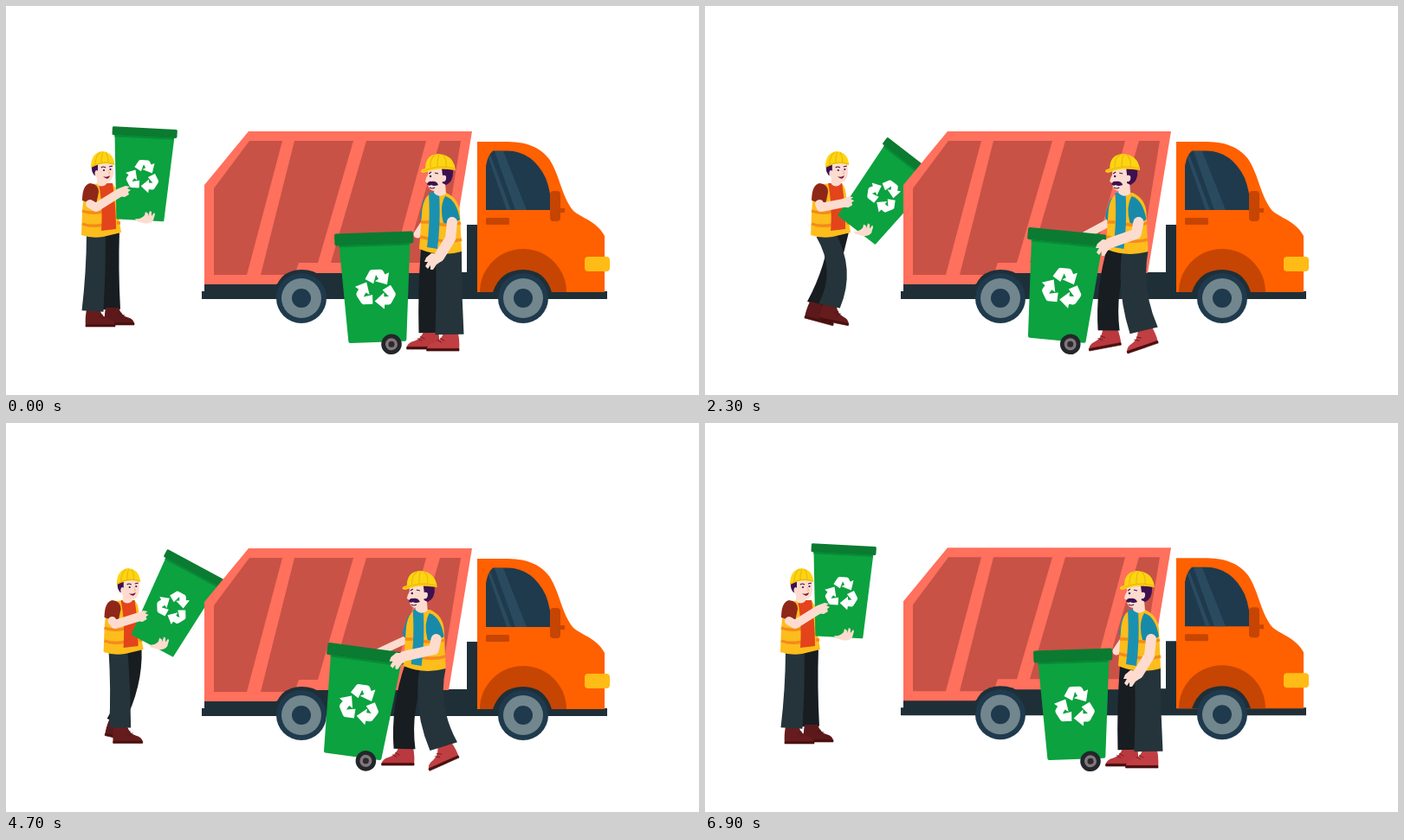
Recreate the animation shown at these times as an HTML page. Size 800x450 px, loop 7 s.

```html
<!DOCTYPE html>
<html lang="en">
<head>
<meta charset="utf-8">
<title>Waste collection</title>
<style>
  html, body { margin: 0; width: 100%; height: 100%; overflow: hidden; background: #fff; }
  svg { display: block; width: 100vw; height: 100vh; }
  .skin { fill: #fddccf; }
  .limb { fill: none; stroke: #fddccf; stroke-linecap: round; stroke-linejoin: round; }
  .hair { fill: #3d1150; }
  .hat { fill: #fcd511; }
  .rib { fill: none; stroke: #f0b413; stroke-width: 1.2; }
  .vest { fill: #fdbd1c; }
  .trim { fill: none; stroke: #f58a1c; stroke-width: 3.4; }
  .near { fill: #25343a; }
  .far { fill: #171d21; }
  .dark { fill: #1f2f38; }
  .navy { fill: #1f3a4d; }
  .steel { fill: #72868e; }
  .panel { fill: #c85246; }
  .rust { fill: #c64503; }
  .bin { fill: #0ba23f; }
  .lid { fill: #0a7b31; }
  .shade { stroke: #088a36; stroke-width: 2; }
</style>
</head>
<body>
<svg viewBox="0 0 800 450">
  <defs>
    <path id="arrow" fill="#fff" d="M-11-11L-6-19.5Q-5-20.5-3-20.5H5Q7-20.5 8-18.5L9.7-15.2L13.8-17L11.5-4.5L-1-8.6L2.8-10.8L.3-15L-2.6-6Z"/>
    <g id="recycle">
      <use href="#arrow"/>
      <use href="#arrow" transform="rotate(120)"/>
      <use href="#arrow" transform="rotate(240)"/>
    </g>
    <g id="shoe">
      <path d="M1-3H16Q19 6 26 8Q34 10 34 16H0Q-1 8 1-3Z"/>
      <path d="M0 14.5H34V17H0ZM15 6L20 3M18 8L23 5" fill="#4a1010" stroke="#4a1010" stroke-width=".6"/>
    </g>
    <g id="wheel">
      <circle r="29" class="navy"/>
      <circle r="23" class="steel"/>
      <circle r="11" class="navy"/>
    </g>
  </defs>

  <g id="loader">
    <path id="lFar" class="far"/>
    <use id="lFarShoe" href="#shoe" fill="#5b191b"/>
    <use id="lNearShoe" href="#shoe" fill="#661c1d"/>
    <path id="lNear" class="near"/>
    <g id="lBody">
      <path class="vest" d="M97 206Q89 216 88 238L87 265Q99 269 112 267L133 262L128 232Q129 209 122 205Z"/>
      <path class="trim" d="M88 237Q98 241 111 238M88 252Q99 256 112 253M127 237H130M128 251H132"/>
      <path fill="#e3441b" d="M107 205H123Q127 230 127 258L110 260Q112 230 107 205Z"/>
      <path fill="#8f2719" d="M97 205Q107 206 107 215L104 230L88 225Q88 207 97 205Z"/>
    </g>
    <g id="lHead">
      <path class="skin" d="M105 195H116V206Q110 211 105 206Z"/>
      <path class="hair" d="M99 184H109V196H102Q98 191 99 184Z"/>
      <path class="skin" d="M106 184L123 182Q126 195 121 202Q114 207 107 200Q101 197 103 191Q105 189 106 191Z"/>
      <path d="M110 187Q112 185 115 187M119 186L123 185" fill="none" stroke="#3d1150" stroke-width="1.2"/>
      <circle cx="113" cy="190" r="1.1" class="hair"/>
      <circle cx="120.5" cy="189" r="1.1" class="hair"/>
      <path d="M118 190L120 194H118" fill="none" stroke="#eeaa99" stroke-width=".8"/>
      <path d="M112 197Q116 199 120 196Q118 203 112 197Z" fill="#7a1530"/>
      <path class="hat" d="M98 187Q98 170 111 168Q124 169 125.5 184Q112 180 98 187Z"/>
      <path class="rib" d="M103 184Q103 173 109 169M110 182Q110 173 112 169M118 182Q118 173 115 169M99 186Q112 178 125 183"/>
    </g>
    <g id="lBin">
      <path class="bin" d="M3 9H72L65 106Q65 107 64 107H11Q10 107 10 106Z"/>
      <rect class="lid" width="75" height="10" rx="1.5"/>
      <path class="shade" d="M3 11H71"/>
      <use href="#recycle" transform="translate(38 56) scale(.92)"/>
    </g>
    <path id="lHold" class="skin" d="M-15 1Q-8 2-4-3L-3-7L0-5V-2L2-8L4-7L4-2L7-6L8-4L6 3Q2 8-6 6L-13 4Z"/>
    <path id="lArm" class="limb" stroke-width="10"/>
    <path id="lHand" class="skin" d="M-5-4L3-7L8-6L5-4L9-2L6 0L7 3L2 6L-5 5Z"/>
  </g>

  <g id="truck">
    <path class="dark" d="M226 330H229V321H340V308H545V330H694V339H226ZM532 253H544V312H532Z"/>
    <path fill="#ff705d" d="M280 145H538L511 309H340L325 310L312 322H229V207Z"/>
    <path class="panel" d="M281 156H319L278 311H240V211ZM333 156H401L360 297H338L333 311H294ZM416 156H485L447 297H375ZM501 156H525L502 297H460Z"/>
    <path class="dark" d="M308 334Q311 322 319 313Q328 305 341 305Q356 305 364 313L380 334Z"/>
    <path fill="#ff6000" d="M544 157H575C600 157 615 162 627 177C640 197 641 220 655 237C664 245 682 249 691 266V331H544Z"/>
    <path class="navy" d="M562 167.5H579Q608 168 623 199Q629 214 630 236H554V185Q556 173 562 167.5Z"/>
    <path fill="#2a4b5f" d="M564 168H574L601 236H588ZM557 176L559 172L583 236H578Z"/>
    <path class="rust" d="M547 331A50 50 0 0 1 647 331Z"/>
    <path class="dark" d="M562 331Q571 305 597 305Q622 305 630 331Z"/>
    <rect class="rust" x="554" y="245" width="27" height="8" rx="1.5"/>
    <path class="rust" d="M632 214H636Q640 214 640 218V234H645V239H640V245Q640 249 636 249H632Q628 249 628 245V218Q628 214 632 214Z"/>
    <rect x="668" y="290" width="29" height="17" rx="4" fill="#ffbc16"/>
    <use href="#wheel" x="341" y="338"/>
    <use href="#wheel" x="597" y="338"/>
  </g>

  <g id="hauler">
    <path id="rReach" class="limb" stroke-width="9"/>
    <path id="rSleeve" class="limb" style="stroke:#178aaa" stroke-width="14"/>
    <g id="rBin">
      <path class="bin" d="M5 13H87L79 125Q79 127 77 127H14Q12 127 12 125Z"/>
      <rect class="lid" width="91" height="14" rx="2"/>
      <path class="shade" d="M5 15H86"/>
      <use href="#recycle" transform="translate(46 66) scale(1.12)"/>
      <circle cx="61.5" cy="130" r="11.8" fill="#22272b"/>
      <circle cx="61.5" cy="130" r="7" fill="#83777a"/>
      <circle cx="61.5" cy="130" r="3.5" fill="#2c2a2d"/>
    </g>
    <use id="rFarShoe" href="#shoe" fill="#b9393e"/>
    <path id="rFar" class="far"/>
    <use id="rNearShoe" href="#shoe" fill="#c13f43"/>
    <path id="rNear" class="near"/>
    <g id="rBody">
      <path class="vest" d="M490 217L508 216Q522 222 524 238L526 284Q501 291 477 281L480 240Q481 222 490 217Z"/>
      <path class="trim" d="M479 250H488M498 252Q512 255 525 251M478 267L487 269M498 271Q512 274 526 270"/>
      <path fill="#1b91b0" d="M488 216L500 215Q502 250 498 281L486 279Q490 248 488 216Z"/>
      <path fill="#178aaa" d="M507 220Q520 224 524 247Q515 253 505 251Q500 232 507 220Z"/>
    </g>
    <path id="rArm" class="limb" stroke-width="12"/>
    <path id="rHand" class="skin" d="M7-8L-3-9L-9-4L-11 1L-7 1L-10 6L-7 9L-4 5L-4 10L-1 10L3 4L9 0Z"/>
    <g id="rHead">
      <path class="skin" d="M495 205H507L508 217Q500 223 494 216Z"/>
      <path class="hair" d="M502 188L516 190Q517 203 508 207L502 204Z"/>
      <path class="skin" d="M487 188H503L504 196Q509 195 508 200Q507 204 504 203Q503 213 496 214Q487 214 487 205L484 203Q485 198 487 195Z"/>
      <path class="hair" d="M486 206Q488 202 491 203Q497 202 499 207Q494 209 491 207Q488 209 486 206Z"/>
      <path d="M488 194L491 192M495 193L499 194M489 210Q492 212 495 210" fill="none" stroke="#3d1150" stroke-width="1.1"/>
      <circle cx="490" cy="197" r="1.2" class="hair"/>
      <path class="hat" d="M484 188Q484 172 499 171Q517 172 519 190Q500 186 482 193L479 192Q478 189 484 188Z"/>
      <path class="rib" d="M490 187Q489 176 496 172M498 186Q498 176 500 172M508 186Q509 177 504 172M481 191Q500 183 518 188"/>
    </g>
  </g>
</svg>
<script>
const LOOP = 7000, STEP = 100;
const $ = id => document.getElementById(id);

const ease = u => (1 - Math.cos(Math.PI * Math.min(1, Math.max(0, u)))) / 2;
// Eases 0 to 1 over a..b and back to 0 over c..d.
const swing = (t, a, b, c, d) => ease((t - a) / (b - a)) * (1 - ease((t - c) / (d - c)));
const mix = (a, b, k) => a.map((v, i) => v + (b[i] - v) * k);
const shift = (x, y, [a, b, turn = 0]) => [a + x, b + y, turn];

const place = (id, [x, y, turn = 0], more = "") =>
  $(id).setAttribute("transform", `translate(${x} ${y}) rotate(${turn}) ${more}`);
const line = (id, ...pts) => $(id).setAttribute("d", "M" + pts.map(p => p.join(" ")).join("L"));

// Trouser leg: two curves offset from the hip-knee-ankle line.
function leg(id, hip, ankle, bend, widths) {
  const knee = [(hip[0] + ankle[0]) / 2 + bend, (hip[1] + ankle[1]) / 2];
  const side = s => {
    const [h, k, a] = [[hip, hip, knee], [knee, hip, ankle], [ankle, knee, ankle]].map(([p, from, to], i) => {
      const dx = to[0] - from[0], dy = to[1] - from[1], w = s * widths[i] / Math.hypot(dx, dy);
      return [p[0] - dy * w, p[1] + dx * w];
    });
    return [h, k.map((c, i) => 2 * c - (h[i] + a[i]) / 2), a];
  };
  const [a, b, c] = side(1), [d, e, f] = side(-1);
  $(id).setAttribute("d", `M${a}Q${b} ${c}L${f}Q${e} ${d}Z`);
}

function drawLoader(t, stride) {
  const k = swing(t, 0, 3400, 3400, 6200);
  const heel = swing(t, 2500, 3200, 4200, 5000);
  const lift = Math.abs(stride), first = Math.max(0, stride);
  const b = 46 * k;
  const hand = mix([135, 215], [172, 231], k);
  const near = shift(11 * first, -6 * lift, mix([100, 353], [157, 352], k));
  const far = shift(-16 * first, -6 * lift - 17 * heel, mix([122, 351], [129, 351], k));
  near[2] = 13 * lift;
  far[2] = 17 * lift * (1 - heel) + 42 * heel;

  place("lBody", [b, 0]);
  place("lHead", [53.5 * k, 0]);
  place("lBin", mix([158, 197, 3], [221.5, 226, 48.5], k), "translate(-38 -56)");
  leg("lNear", [104 + b, 264], near, 1 + 11 * lift, [11, 11.5, 12.5]);
  leg("lFar", [120 + b, 260], far, 4 * lift + 23 * heel, [11, 9.5, 10]);
  place("lNearShoe", near, "translate(-8 1)");
  place("lFarShoe", far, "translate(-8 1)");
  line("lArm", [97 + b, 229], [104 + b * .85, 233], shift(-4, 1, hand).slice(0, 2));
  place("lHand", hand);
  place("lHold", mix([164, 245], [193, 264], k));
}

function drawHauler(t, stride) {
  const k = swing(t, 0, 3400, 4400, 6900);
  const b = -19 * k;
  const hand = mix([494, 295], [452, 274], k);
  const near = mix([512, 380, 0], [505, 374, -25], k);
  const far = mix([489, 378, 0], [459, 377, 0], k);
  far[1] -= 2 * Math.abs(stride);
  far[2] = -12 * Math.abs(stride);
  const bend = [485 + b * 1.1, 249];
  const flip = "translate(11 1) scale(-1.1 1.06)";

  place("rBody", [b, 0]);
  place("rHead", [-22 * k, 0]);
  place("rBin", mix([379, 263.5, -2], [371.5, 253.5, 8], k));
  leg("rNear", [511 + b, 283], near, -8 * k, [15, 15, 16.5]);
  leg("rFar", [492 + b, 281], far, -2 - 4 * k, [13, 12, 12.5]);
  place("rNearShoe", near, flip);
  place("rFarShoe", far, flip);
  line("rReach", bend, mix([475, 264], [429, 265], k));
  line("rSleeve", [488 + b, 228], [bend[0], 243]);
  line("rArm", [515 + b, 250], mix([513, 269], [493, 262], k), shift(6, -5, hand).slice(0, 2));
  place("rHand", hand);
}

function frame(now) {
  const t = Math.floor(now % LOOP / STEP) * STEP;
  const stride = t < 3400 ? Math.sin(2 * Math.PI * t / 3400) : 0;
  drawLoader(t, stride);
  drawHauler(t, stride);
  // The idling engine rocks the truck slightly.
  place("truck", [0, -.8 * swing(t, 3300, 4000, 6900, LOOP) * Math.cos(2 * Math.PI * (t - 4000) / 2800)]);
  requestAnimationFrame(frame);
}
frame(performance.now());
</script>
</body>
</html>
```
